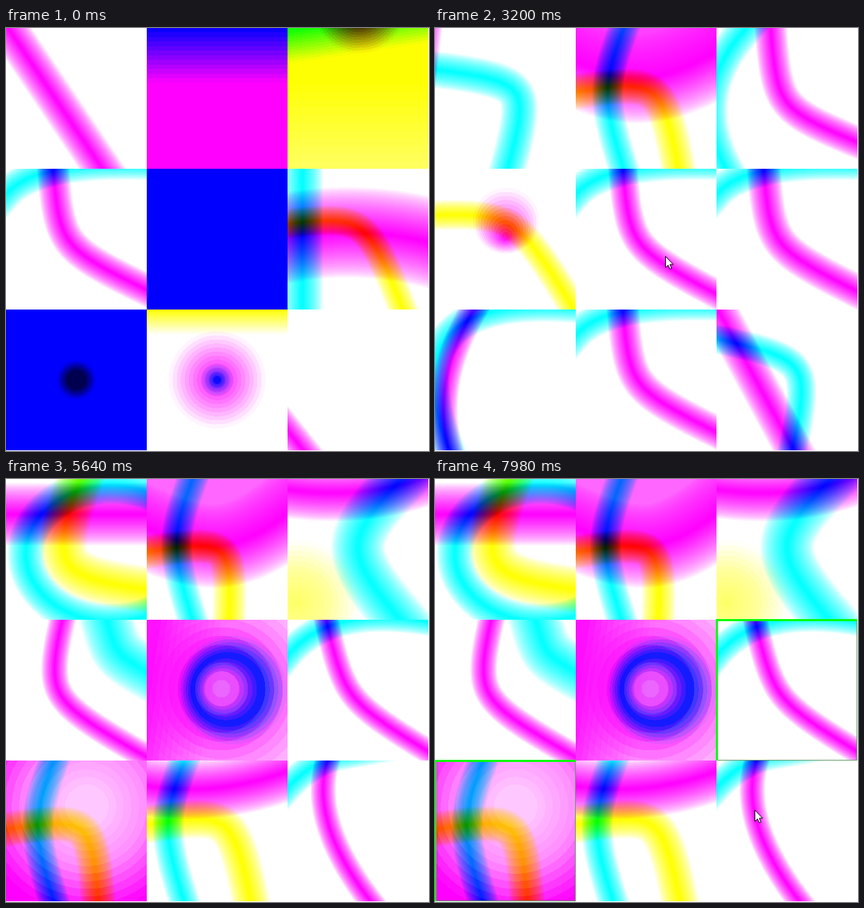
Recreate the animation shown at these times as an HTML page with a canvas. Size 601 by 601 pixels, loop 8000 ms.

```html
<!DOCTYPE html>
<html lang="en">
<head>
<meta charset="utf-8">
<title>Tile picker</title>
<style>
  html, body { margin: 0; width: 100%; height: 100%; overflow: hidden; background: #fff; }
  canvas { display: block; }
</style>
</head>
<body>
<canvas id="stage" width="601" height="601"></canvas>
<script>
const LOOP = 8000, T = 200;
const C = [0, 255, 255], M = [255, 0, 255], Y = [255, 255, 0];
const BLUE = [0, 0, 255], NAVY = [0, 0, 70];

const newCanvas = size => Object.assign(document.createElement('canvas'), { width: size, height: size });
const ctx = document.getElementById('stage').getContext('2d');
const ink = newCanvas(T), L = ink.getContext('2d');
let page, tx, ty;

const tint = (col, a) => `rgb(${col.map(v => Math.round(255 - a * (255 - v)))})`;

// Inks are painted on white and multiplied onto the current tile.
function layer(paint) {
  L.fillStyle = '#fff';
  L.fillRect(0, 0, T, T);
  paint();
  page.drawImage(ink, tx, ty);
}

function tile(col, row) {
  tx = col * T;
  ty = row * T;
}

// Point beyond a, on the line coming from b.
function beyond(a, b, reach = 80) {
  const dx = a[0] - b[0], dy = a[1] - b[1], k = reach / Math.hypot(dx, dy);
  return [a[0] + dx * k, a[1] + dy * k];
}

// Conic from a to c around corner b; a larger sharpness hugs the corner.
function conic(a, b, c, sharp) {
  const path = new Path2D();
  path.moveTo(...beyond(a, b));
  for (let t = 0; t <= 1.001; t += 0.025) {
    const p = (1 - t) ** 2, q = 2 * sharp * t * (1 - t), r = t * t, sum = p + q + r;
    path.lineTo((a[0] * p + b[0] * q + c[0] * r) / sum, (a[1] * p + b[1] * q + c[1] * r) / sum);
  }
  path.lineTo(...beyond(c, b));
  return path;
}

function soft(col, width, path) {
  layer(() => {
    const n = Math.max(14, Math.round(width / 5));
    L.lineJoin = 'round';
    for (let i = 0; i < n; i++) {
      L.strokeStyle = tint(col, ((i + 0.5) / n) ** 0.7);
      L.lineWidth = width * (1 - i / n);
      L.stroke(path);
    }
  });
}

const bend = (col, width, a, b, c, sharp = 2.5) => soft(col, width, conic(a, b, c, sharp));
const line = (col, width, a, c) => bend(col, width, a, [(a[0] + c[0]) / 2, (a[1] + c[1]) / 2], c);

function ring(col, width, ...shape) {
  const path = new Path2D();
  path.ellipse(...shape, 0, 0, 7);
  soft(col, width, path);
}

// Soft band with an even tint over everything above it.
function field(col, a, width, ...corners) {
  const path = conic(...corners, 1.5);
  soft(col, width, path);
  path.lineTo(400, -100);
  path.lineTo(-200, -100);
  layer(() => {
    L.fillStyle = tint(col, a);
    L.fill(path);
  });
}

function shade(g, col, stops) {
  const n = 12, last = stops.length - 1;
  for (let i = 0; i < n; i++) {
    const u = (i + 0.5) / n * last, k = Math.floor(u);
    const a = stops[k] + (stops[k + 1] - stops[k]) * (u - k);
    g.addColorStop(i / n, tint(col, a));
    g.addColorStop((i + 1) / n, tint(col, a));
  }
  g.addColorStop(1, tint(col, stops[last]));
  layer(() => {
    L.fillStyle = g;
    L.fillRect(0, 0, T, T);
  });
}

const ramp = (col, [x0, y0], [x1, y1], ...stops) => shade(L.createLinearGradient(x0, y0, x1, y1), col, stops);
const radial = (col, [x0, y0, r0], [x1, y1, r1], ...stops) =>
  shade(L.createRadialGradient(x0, y0, r0, x1, y1, r1), col, stops);
const spot = (col, x, y, r0, r1, ...stops) => radial(col, [x, y, r0], [x, y, r1], ...stops);
const solid = col => ramp(col, [0, 0], [0, T], 1, 1);

// Recurring motifs
function hook(width, endY) {
  bend(C, 46, [0, 36], [42, -12], [T, -7], 1);
  bend(M, width, [67, 0], [75, 112], [T, endY]);
}

function crossing(x, y, foot, width) {
  bend(C, 44, [x, 0], [x - 34, 92], [x, T], 2);
  bend(Y, width, [0, y], [122, y - 20], [foot, T]);
}

function sceneA() {
  tile(0, 0);
  line(M, 55, [3, 0], [137, T]);
  tile(1, 0);
  solid(M);
  ramp(C, [0, 0], [0, 78], 1, 0);
  tile(2, 0);
  ramp(Y, [0, 70], [0, T], 1, 0.62);
  ramp(C, [0, 4], [7, 50], 0.95, 0);
  spot(M, 102, -29, 20, 65, 0.95, 0);

  tile(0, 1);
  hook(46, 172);
  tile(1, 1);
  solid(BLUE);
  tile(2, 1);
  line(C, 58, [21, 0], [21, T]);
  bend(M, 128, [0, 98], [100, 80], [T, 104], 1);
  bend(Y, 42, [0, 78], [112, 64], [164, T]);

  tile(0, 2);
  solid(BLUE);
  spot(NAVY, 100, 100, 12, 28, 1, 0);
  tile(1, 2);
  ramp(Y, [0, 0], [0, 36], 1, 0);
  spot(M, 100, 100, 0, 69, 1, 0);
  spot(C, 100, 100, 3, 24, 1, 0.4, 0);
  tile(2, 2);
  line(M, 44, [0, 172], [24, 202]);
}

function sceneB() {
  tile(0, 0);
  line(M, 46, [-13, 0], [-20, 60]);
  bend(C, 52, [0, 59], [138, 76], [103, T]);
  tile(1, 0);
  field(M, 0.75, 126, [0, 48], [95, 92], [T, 35]);
  crossing(68, 91, 146, 50);
  tile(2, 0);
  bend(C, 50, [42, 0], [-43, 95], [13, T], 1);
  bend(M, 46, [77, 0], [85, 115], [T, 162]);

  tile(0, 1);
  bend(Y, 42, [0, 66], [115, 62], [198, T]);
  radial(M, [100, 98, 2], [101, 74, 47], 0.95, 0);
  tile(1, 1);
  hook(42, 178);
  tile(2, 1);
  hook(48, 174);

  tile(0, 2);
  bend(C, 46, [T, -4], [-70, -25], [20, T], 1);
  bend(M, 40, [55, 0], [-6, 105], [20, T], 1);
  tile(1, 2);
  hook(46, 174);
  tile(2, 2);
  line(M, 54, [2, 0], [110, T]);
  bend(C, 42, [0, 42], [136, 70], [108, T]);
}

function sceneC() {
  tile(0, 0);
  line(M, 88, [0, 50], [T, 50]);
  ring(C, 52, 150, 106, 122, 97);
  bend(Y, 66, [105, 0], [55, 138], [T, 157], 2);
  tile(1, 0);
  field(M, 0.6, 118, [0, 70], [110, 118], [T, 50]);
  crossing(65, 104, 117, 48);
  tile(2, 0);
  bend(M, 80, [0, 15], [110, 30], [T, -4], 1);
  bend(C, 76, [162, 0], [70, 95], [160, T], 2);
  spot(Y, 14, 175, 0, 88, 0.6, 0.4, 0);

  tile(0, 1);
  bend(M, 38, [80, 0], [54, 112], [T, 195]);
  bend(C, 76, [143, 0], [156, 49], [T, 74]);
  tile(1, 1);
  spot(M, 106, 98, 0, 150, 0.55, 0.95, 0.5, 0.2);
  ramp(M, [0, 80], [100, 95], 0.95, 0);
  radial(C, [106, 98, 20], [122, 100, 77], 0, 1, 0);
  tile(2, 1);
  bend(C, 42, [0, 51], [60, -22], [T, 2], 1);
  bend(M, 36, [55, 0], [80, 114], [T, 187]);

  tile(0, 2);
  spot(M, 115, 65, 20, 150, 0.2, 0.45, 1);
  crossing(68, 98, 131, 50);
  tile(1, 2);
  bend(M, 84, [0, 36], [100, 52], [T, 15], 1);
  crossing(53, 91, 148, 54);
  tile(2, 2);
  bend(C, 42, [0, 39], [35, 0], [80, -8], 1);
  bend(M, 36, [57, 0], [30, 85], [118, T], 1);
}

const scenes = [[0, sceneA], [2600, sceneB], [5640, sceneC]].map(([start, paint]) => {
  const art = newCanvas(600);
  page = art.getContext('2d');
  page.fillStyle = '#fff';
  page.fillRect(0, 0, 600, 600);
  page.globalCompositeOperation = 'multiply';
  paint();
  return { start, art };
});

// Click time, column, row
const picks = [
  [1230, 2, 1], [2030, 0, 1],
  [3540, 1, 1], [4170, 2, 2], [5000, 1, 0],
  [6940, 0, 2], [7740, 2, 1]
];

const glide = u => u * u * (3 - 2 * u);
const settle = u => 1 - (1 - u) ** 3;

// The cursor enters at a point, then makes moves of [start, end, x, y].
const visits = [
  { until: 2600, enter: [563, 575], moves: [
    [640, 980, 457, 285], [1230, 1850, 93, 385], [2030, 2280, 463, 514], [2450, 2600, 540, 606]] },
  { until: 5180, enter: [569, 565], moves: [
    [3000, 3370, 302, 299], [3540, 4000, 470, 528], [4170, 4800, 308, 116], [4980, 5180, 500, 350]] },
  { until: LOOP, enter: [582, 420], moves: [
    [6280, 6520, 116, 464], [6520, 6770, 84, 496], [6940, 7570, 457, 230], [7740, 7980, 454, 470]] }
];

function cursorAt(t) {
  const { enter, moves } = visits.find(v => t < v.until);
  let pos = null, ease = settle;
  for (const [from, to, x, y] of moves) {
    if (t < from) break;
    const [x0, y0] = pos || enter;
    const k = ease(Math.min(1, (t - from) / (to - from)));
    pos = [x0 + (x - x0) * k, y0 + (y - y0) * k];
    ease = glide;
  }
  return pos && pos.map(Math.round);
}

const arrow = new Path2D('M.5 .5V16.5L4.2 13L6.8 18.5L9.2 17.5L6.8 12H11.5Z');

function drawCursor([x, y]) {
  ctx.save();
  ctx.translate(x, y);
  ctx.fillStyle = '#fff';
  ctx.fill(arrow);
  ctx.strokeStyle = '#000';
  ctx.lineWidth = 1;
  ctx.stroke(arrow);
  ctx.restore();
}

function drawFrames(chosen) {
  ctx.fillStyle = '#696';
  for (const [, c, r] of chosen) {
    ctx.fillRect(c * T + T - 1, r * T, 1, T);
    ctx.fillRect(c * T, r * T + T - 1, T, 1);
  }
  ctx.fillStyle = '#0f0';
  for (const [, c, r] of chosen) {
    ctx.fillRect(c * T - 1, r * T - 1, T + 1, 3);
    ctx.fillRect(c * T - 1, r * T - 1, 3, T + 1);
  }
}

function draw(t) {
  const scene = scenes.filter(s => s.start <= t).pop();
  ctx.fillStyle = '#fff';
  ctx.fillRect(0, 0, 601, 601);
  ctx.drawImage(scene.art, 0, 0);
  drawFrames(picks.filter(p => p[0] >= scene.start && p[0] <= t));
  const pos = cursorAt(t);
  if (pos) drawCursor(pos);
}

const begin = performance.now();
function tick() {
  draw((performance.now() - begin) % LOOP);
  requestAnimationFrame(tick);
}
tick();
</script>
</body>
</html>
```
